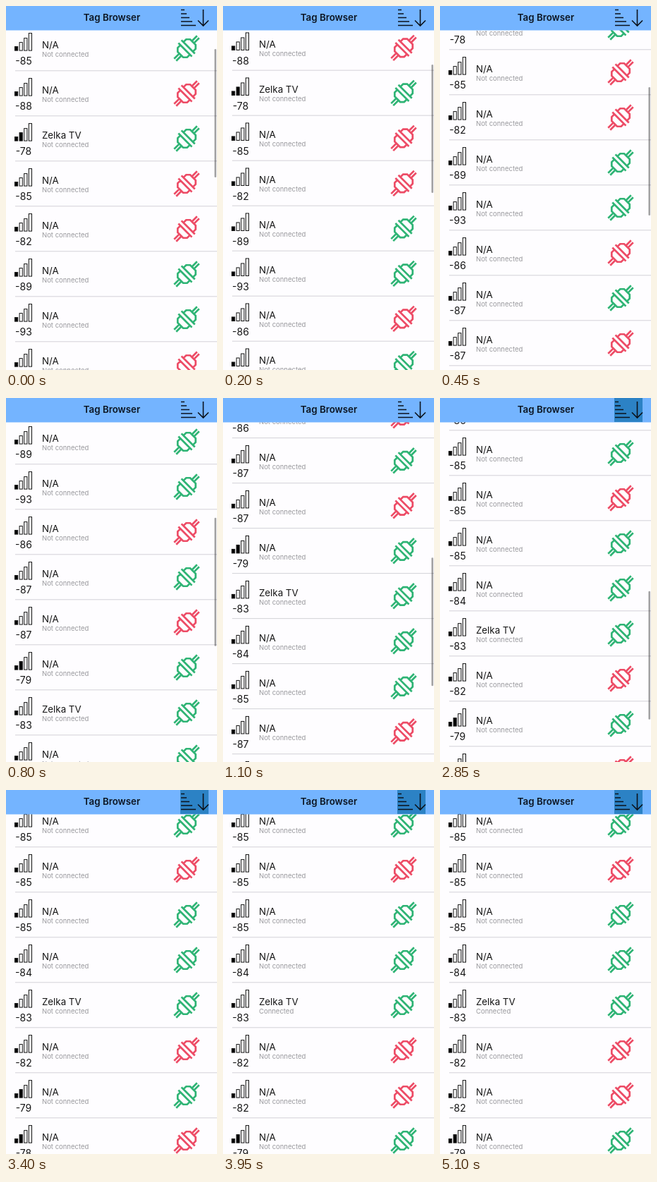
An HTML page that plays this animation: 299 by 516 pixels, repeating every 5150 ms.

```html
<!DOCTYPE html>
<html lang="en">
<head>
<meta charset="utf-8">
<title>Tag Browser</title>
<style>
html, body { margin: 0; width: 100%; height: 100%; overflow: hidden; background: #fefdff; }
svg { display: block; font-family: Inter, Roboto, "Liberation Sans", sans-serif; }
.title { font-size: 13.3px; font-weight: 600; text-anchor: middle; fill: #0c1522; }
.name { font-size: 13.3px; fill: #161616; }
.state { font-size: 9.5px; fill: #99999d; }
.level { font-size: 14px; text-anchor: middle; fill: #161616; }
.line { fill: none; stroke-width: 2.7; }
</style>
</head>
<body>
<svg width="299" height="516" viewBox="0 0 299 516">
  <defs>
    <g id="plug" class="line" transform="rotate(-45)">
      <path id="half" d="M3 -13.5V13.5M3 -9.5H8.5L12.5 -5.5V5.5L8.5 9.5H3M12.5 -2.1H23M12.5 2.1H23"/>
      <use href="#half" transform="scale(-1 1)"/>
    </g>
  </defs>
  <g id="lists"></g>
  <rect id="thumb" x="295.4" width="2.6" height="182" rx="1.3" fill="#000" fill-opacity=".36"/>
  <rect width="299" height="34.5" fill="#74b4ff"/>
  <rect id="press" x="247" width="40" height="34" fill="#2c82c5"/>
  <text class="title" x="150" y="21.3">Tag Browser</text>
  <path d="M248 5.5h5M248 11h8M248 16.5h12M248 22h16M248 27.5h21M279.5 5V28M272 20.5L279.5 28L287 20.5"
        fill="none" stroke="#0c131c" stroke-width="1.6"/>
</svg>
<script>
const LOOP = 5150, STEP = 50, PITCH = 64, TOP = 34;
const SORT = 1950, UPDATE = 3650, CONNECT = 3950;
const COLORS = { g: '#2fb475', r: '#ed4c66' };

// Each entry: signal level, plug colour, * for the named device
const found = '84r 85g 88r 78g* 85r 82r 89g 93g 86r 87g 87r 79g 83g* 84g 85g 87r 85r 88g 82r 85g 78r'.split(' ');
const sorted = '93g 91r 89g 89r 88r 88g 87r 87g 87g 87r 86r 85g 85r 85g 84g 83g* 82r 79g 78r 78g* 77g'.split(' ');
const updated = [...sorted.slice(0, 17), '82r', ...sorted.slice(17)];

// Scroll keys: time, offset, velocity
const keys = [
  [0, 71, .3], [450, 229, .4], [800, 389, .62], [1200, 571, 0],
  [2650, 571, 0], [2650, 571, .8], [2850, 693, .26], [3150, 722, 0], [LOOP, 722, 0]
];

const byId = id => document.getElementById(id);

function bars(level) {
  const filled = level < 80 ? 2 : 1;
  return [6, 12, 18, 25].map((h, i) =>
    `<rect x="${12.5 + i * 6.6}" y="${36.6 - h}" width="4.2" height="${h - .5}"
      fill="${i < filled ? '#000' : '#fff'}" stroke="#111"/>`).join('');
}

function row(item, i) {
  const level = parseInt(item), named = item.endsWith('*');
  return `<g transform="translate(0 ${i * PITCH})">${bars(level)}
    <text class="level" x="25" y="56.2">-${level}</text>
    <text class="name" x="51" y="32.9">${named ? 'Zelka TV' : 'N/A'}</text>
    <text class="state" x="51" y="44.9">Not connected</text>
    <use href="#plug" transform="translate(256 33)" stroke="${COLORS[item[2]]}"/>
    <rect x="13" y="64.3" width="286" height="1" fill="#d3d2d7"/></g>`;
}

byId('lists').innerHTML = [found, sorted, updated]
  .map(list => `<g>${list.map(row).join('')}</g>`).join('');
const views = [...byId('lists').children];
const state = views[2].children[15].querySelector('.state');

function scrollAt(t) {
  let i = 0;
  while (i < keys.length - 2 && t >= keys[i + 1][0]) i++;
  const [t0, a, va] = keys[i], [t1, b, vb] = keys[i + 1];
  const d = t1 - t0, u = (t - t0) / d, w = 1 - u;
  return a * w * w * (1 + 2 * u) + b * u * u * (3 - 2 * u) + d * u * w * (va * w - vb * u);
}

function thumbAlpha(t) {
  const [start, end] = t < 2700 ? [1450, 1700] : [3200, 3400];
  return Math.max(0, Math.min(1, (end - t) / (end - start)));
}

function draw(t) {
  const y = scrollAt(t);
  const shown = t < SORT ? 0 : t < UPDATE ? 1 : 2;
  views.forEach((v, i) => v.setAttribute('display', i === shown ? 'inline' : 'none'));
  byId('lists').setAttribute('transform', `translate(0 ${TOP - y})`);
  byId('thumb').setAttribute('y', 36.7 + y * .342);
  byId('thumb').setAttribute('opacity', thumbAlpha(t));
  byId('press').setAttribute('opacity', t < SORT ? 0 : 1);
  state.textContent = t < CONNECT ? 'Not connected' : 'Connected';
}

const begin = performance.now();
function tick() {
  const t = (performance.now() - begin) % LOOP;
  draw(Math.floor(t / STEP) * STEP);
  requestAnimationFrame(tick);
}
tick();
</script>
</body>
</html>
```
